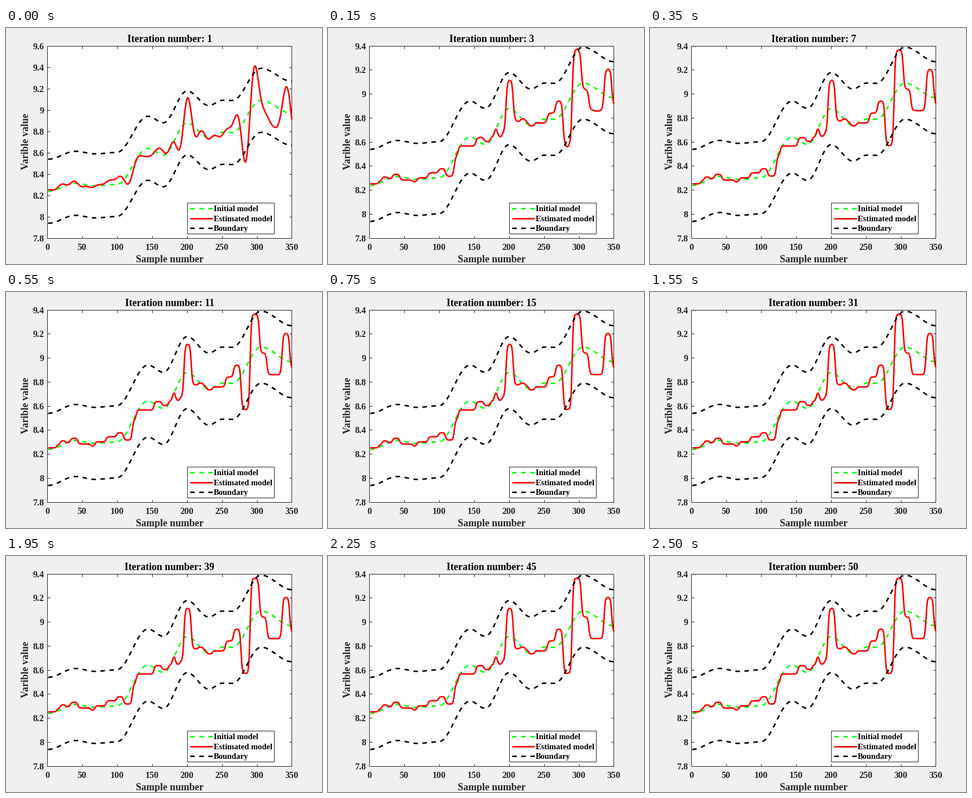
These frames come from a looping animation (560x420 px, 2.55 s). A matplotlib script:

```python
import numpy as np
import matplotlib.pyplot as plt
from matplotlib.animation import FuncAnimation
from matplotlib.lines import Line2D
from matplotlib.patches import Rectangle

W, H, DPI = 560, 420, 100
# Just off the pixel centres, so that snapping picks the right row and column
LEFT, RIGHT, TOP, BOTTOM = 73.49, 506.49, 31.51, 373.51
PX = 72 / DPI  # points per pixel
INK = "#262626"
GREEN, RED, BLACK = "#00ff00", "#ff0000", "#000000"
LINE_W = 2.67

CUTOFF = 16   # shortest wavelength in the first estimate, in samples
REACH = 64    # half length of the low-pass kernel
STEP_W = 1.7  # softness of the layer edges

plt.rcParams["font.family"] = "Liberation Serif"
plt.rcParams["font.weight"] = "bold"

samples = np.arange(1, 351)

# Turning points of the initial model
turns = [(1, 8.237), (40, 8.311), (68, 8.287), (99, 8.300), (144, 8.639),
         (166, 8.579), (200, 8.876), (231, 8.740), (251, 8.789),
         (265, 8.787), (306, 9.088), (350, 8.967)]

# Layer edges and the level after each
layers = [(13, 8.275), (18, 8.308), (26, 8.292), (33, 8.330), (43.5, 8.282),
          (62, 8.264), (68, 8.300), (84, 8.342), (99, 8.376), (109, 8.315),
          (121.5, 8.480), (127, 8.565), (152.5, 8.635), (164, 8.602),
          (173, 8.640), (179, 8.718), (183.3, 8.645), (190, 8.675),
          (195.5, 9.113), (206, 8.775), (216, 8.790), (223, 8.765),
          (228, 8.732), (236.5, 8.757), (254.8, 8.840), (266.5, 8.938),
          (277.3, 8.570), (290.3, 9.362), (303.5, 9.040), (314.3, 8.860),
          (336, 9.203), (347, 8.920), (353, 8.600)]


def glide(points, x):
    """Cosine easing from each turning point to the next."""
    px, py = np.array(points).T
    i = np.clip(np.searchsorted(px, x, "right") - 1, 0, len(px) - 2)
    t = (x - px[i]) / (px[i + 1] - px[i])
    return py[i] + (py[i + 1] - py[i]) * (1 - np.cos(np.pi * t)) / 2


def layered(x, base=8.25):
    """Sum of soft steps, one at each layer edge."""
    y, level = np.full(len(x), base), base
    for edge, value in layers:
        y += (value - level) * (1 + np.tanh((x - edge) / STEP_W)) / 2
        level = value
    return y


def low_pass():
    """The layered curve without its short wavelengths."""
    lag = np.arange(-REACH, REACH + 1)
    kernel = np.sinc(2 * lag / CUTOFF) * np.cos(np.pi * lag / (2 * REACH)) ** 2
    wide = np.arange(1 - REACH, 351 + REACH)
    return np.convolve(layered(wide), kernel / kernel.sum(), "valid")


initial = glide(turns, samples)
final = layered(samples)
ringing = low_pass() - final


def estimate(k):
    """The ringing of the first estimate dies away with the iterations."""
    return final + ringing / k ** 1.5


fig = plt.figure(figsize=(W / DPI, H / DPI), dpi=DPI, facecolor="#f0f0f0")
ax = fig.add_axes([LEFT / W, 1 - BOTTOM / H,
                   (RIGHT - LEFT) / W, (BOTTOM - TOP) / H])
ax.set_xlim(0, 350)
ax.set_xticks(range(0, 351, 50))
ax.tick_params(direction="in", length=4.5 * PX, width=PX, color=INK,
               top=True, right=True, labelbottom=False, labelleft=False)
for spine in ax.spines.values():
    spine.set(color=INK, linewidth=PX)

# Overlay in pixel units for text and legend
page = fig.add_axes([0, 0, 1, 1])
page.set(xlim=(0, W), ylim=(H, 0))
page.axis("off")


def style(color, dashed):
    look = dict(color=color, linewidth=LINE_W * PX, clip_on=False,
                solid_capstyle="butt")
    if dashed:
        look["dashes"] = (3, 3)
    return look


def put(x, y, s, size, color=INK, ha="center", rotation=0):
    return page.text(x, y, s, fontsize=size * PX, color=color, ha=ha,
                     va="baseline", rotation=rotation, rotation_mode="anchor")


ax.plot(samples, initial, zorder=3, **style(GREEN, True))
model, = ax.plot(samples, final, zorder=4, **style(RED, False))
for offset in (-0.3, 0.3):
    ax.plot(samples, initial + offset, zorder=5, **style(BLACK, True))

title = put(290, 25, "", 17.6, BLACK)
put(290, 417, "Sample number", 17.6)
put(40, 202, "Varible value", 17.6, rotation=90)
for v in range(0, 351, 50):
    put(LEFT - 0.5 + v / 350 * (RIGHT - LEFT), 395, str(v), 16)
y_values = [7.8 + 0.2 * i for i in range(10)]
y_labels = [put(67.5, 0, f"{v:g}", 16, ha="right") for v in y_values]

page.add_patch(Rectangle((321.49, 310.51), 154, 55, facecolor="white",
                         edgecolor=INK, linewidth=PX))
entries = [("Initial model", GREEN, True), ("Estimated model", RED, False),
           ("Boundary", BLACK, True)]
for y, (name, color, dashed) in zip((321, 338.5, 356), entries):
    page.add_line(Line2D([325.5, 365.5], [y, y], **style(color, dashed)))
    put(368, y + 5.5, name, 14.4, BLACK, ha="left")


def draw(frame):
    k = max(1, frame)  # the first iteration is held twice as long
    curve = estimate(k)
    model.set_ydata(curve)
    title.set_text(f"Iteration number: {k}")
    top = 9.6 if curve.max() > 9.4 else 9.4
    ax.set_ylim(7.8, top)
    ax.set_yticks([v for v in y_values if v < top + 0.01])
    for v, label in zip(y_values, y_labels):
        label.set_y(BOTTOM - (v - 7.8) / (top - 7.8) * (BOTTOM - TOP) + 6)
        label.set_visible(v < top + 0.01)
    return []


anim = FuncAnimation(fig, draw, frames=51, interval=50, init_func=lambda: draw(0),
                     repeat=True, repeat_delay=0, blit=False)
plt.show()
```
